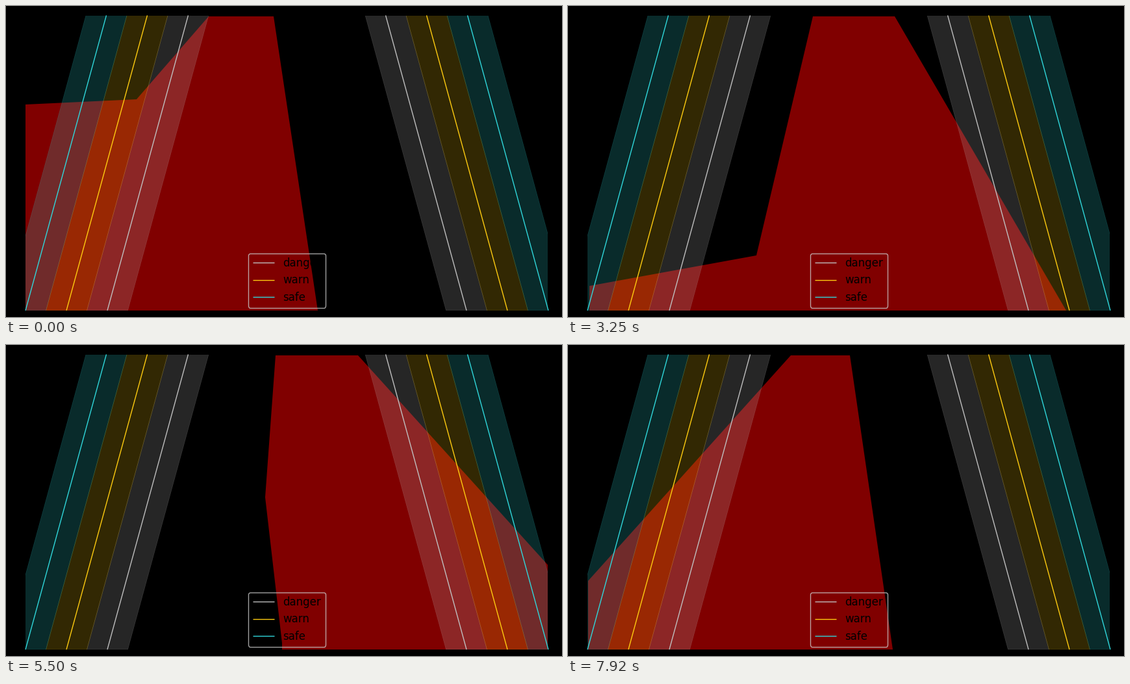
These frames come from a looping animation (856 px wide and 480 px high, 8 s). A matplotlib script:

```python
import numpy as np
import matplotlib.pyplot as plt
from matplotlib.animation import FuncAnimation
from matplotlib.patches import Polygon, Rectangle

W, H, DPI = 856, 480, 100
FRAMES, INTERVAL = 160, 50      # 8 s loop
STEP_RATE = 12                  # the picture moves on 12 times a second
HOLDS = (19, 31)                # steps that repeat the one before

LEFT, RIGHT, TOP, BOTTOM = 30, 834.5, 14.5, 470
MIRROR = 865                    # sum of the x of a line and its twin
LEAN, HALF = 124.5, 31.5        # run of a line, half the width of a zone
HORIZON = 16

ZONES = {"danger": "silver", "warn": "#ffcc10", "safe": "#30d8dc"}

# Key poses of the track area: its left side runs from an end point over a
# knee up to the horizon, its right side is one straight line.
POSES = np.array([
    # step, end x, y, knee x, y, top left, top right, right foot
    (0, 30, 152, 201, 144, 312, 412, 480),
    (23, 32, 292, 145, 272, 338, 440, 545),
    (39, 33, 432, 290, 385, 377, 503, 767),
    (51, 404, 466, 396, 255, 411, 539, 957),
    (66, 425, 460, 399, 235, 415, 542, 952),
    (82, 31, 403, 188, 210, 346, 442, 527),
    (95, 31, 364, 187, 190, 343, 434, 500),
])


def outline(frame):
    step = round(frame * INTERVAL * STEP_RATE / 1000)
    if step in HOLDS:
        step -= 1
    end_x, end_y, knee_x, knee_y, left, right, foot = (
        np.interp(step, POSES[:, 0], column) for column in POSES[:, 1:].T)
    return [(end_x, BOTTOM), (end_x, end_y), (knee_x, knee_y),
            (left, HORIZON), (right, HORIZON), (foot, BOTTOM)]


fig = plt.figure(figsize=(W / DPI, H / DPI), dpi=DPI, facecolor="black")
ax = fig.add_axes([0, 0, 1, 1])
ax.set(xlim=(0, W), ylim=(H, 0))
ax.axis("off")
stage = Rectangle((LEFT, TOP), RIGHT - LEFT, BOTTOM - TOP,
                  transform=ax.transData)


def add_polygon(points, **style):
    patch = ax.add_patch(Polygon(points, **style))
    patch.set_clip_path(stage)
    return patch


def add_zone(top, bottom, color):
    add_polygon([(top - HALF, TOP), (top + HALF, TOP),
                 (bottom + HALF, BOTTOM), (bottom - HALF, BOTTOM)],
                color=color, alpha=0.2, lw=0.5, zorder=2)
    line, = ax.plot([top, bottom], [TOP, BOTTOM], color=color, lw=1,
                    solid_capstyle="butt", zorder=3)
    return line


area = add_polygon(outline(0), facecolor="maroon", edgecolor="none", zorder=1)

keys = []
for n, color in enumerate(ZONES.values()):
    x = 280.5 - 2 * HALF * n
    keys.append(add_zone(x, x - LEAN, color))
    add_zone(MIRROR - x, MIRROR - x + LEAN, color)

legend = ax.legend(keys, ZONES, loc="lower center", borderaxespad=0,
                   bbox_to_anchor=(432.5, 465.5), bbox_transform=ax.transData,
                   prop={"family": "DejaVu Sans", "size": 12},
                   facecolor="none", edgecolor="0.8", framealpha=0.8)
legend.set_zorder(4)


def update(frame):
    area.set_xy(outline(frame))
    return (area,)


anim = FuncAnimation(fig, update, frames=FRAMES, interval=INTERVAL,
                     repeat=True, repeat_delay=0, blit=False)
plt.show()
```
